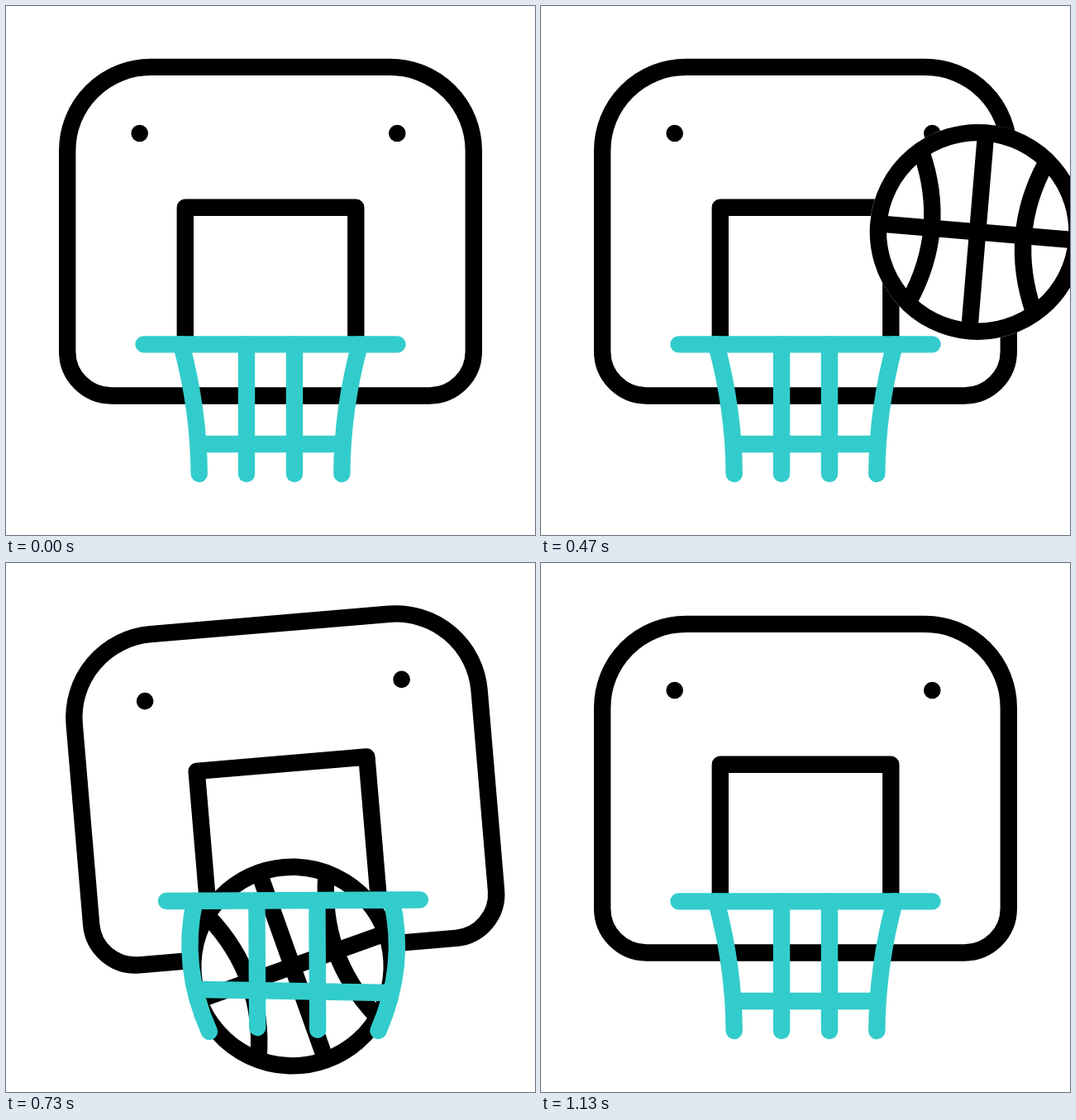
These frames come from a looping animation (640x640 px, 1.67 s). An HTML page with a canvas:

```html
<!DOCTYPE html>
<html lang="en">
<head>
<meta charset="utf-8">
<title>Basketball hoop</title>
<style>
  html, body { margin: 0; width: 100%; height: 100%; overflow: hidden; background: #fff; }
  canvas { display: block; width: 640px; height: 640px; }
</style>
</head>
<body>
<canvas id="stage" width="640" height="640"></canvas>
<script>
const ctx = document.getElementById('stage').getContext('2d');
const BLACK = '#000', TEAL = '#33cccc', WHITE = '#fff';
const LOOP = 1670, WIDTH = 20.4, RIM = 409.4, PIVOT = 84;
const RAD = Math.PI / 180, SIDES = [-1, 1];

// Times are in ticks of 1/30 s.
const part = (t, a, b) => Math.min(1, Math.max(0, (t - a) / (b - a)));
const ease = (t, a, b) => (1 - Math.cos(Math.PI * part(t, a, b))) / 2;
const pulse = (t, a, b, c) => ease(t, a, b) - ease(t, b, c);

function pen(color, cap) {
  ctx.strokeStyle = color;
  ctx.lineWidth = WIDTH;
  ctx.lineCap = cap;
  ctx.lineJoin = 'round';
}

function line(...p) {
  ctx.beginPath();
  for (let i = 0; i < p.length; i += 2) ctx.lineTo(p[i], p[i + 1]);
  ctx.stroke();
}

function bend(x0, y0, cx, cy, x1, y1) {
  ctx.beginPath();
  ctx.moveTo(x0, y0);
  ctx.quadraticCurveTo(cx, cy, x1, y1);
  ctx.stroke();
}

function disc(x, y, r, color) {
  ctx.fillStyle = color;
  ctx.beginPath();
  ctx.arc(x, y, r, 0, 2 * Math.PI);
  ctx.fill();
}

function turn(y, angle) {
  ctx.translate(320, y);
  ctx.rotate(angle * RAD);
  ctx.translate(-320, -y);
}

// The board swings back, forward and to rest.
function boardAngle(t) {
  return -5.5 * pulse(t, 18.6, 23, 27) + 2.65 * pulse(t, 23, 27, 31);
}

function drawBoard() {
  pen(BLACK, 'butt');
  ctx.beginPath();
  ctx.roundRect(74.2, 73.9, 491.6, 397.6, [101, 101, 53.5, 53.5]);
  ctx.stroke();
  line(216.8, 412, 216.8, 243.8, 423.3, 243.8, 423.3, 412);
  for (const s of SIDES) disc(317.5 + s * 155.8, 154, 10.3, BLACK);
}

// Thrown in along an arc, dropped, braked by the net, then falling on.
function ballPlace(t) {
  const thrown = 762 - 371 * ((t - 6) / 11) ** 1.45;
  const drift = 346.5 - 5.5 * Math.max(0, t - 22);
  const s = t - 21, fall = t - 16;
  const y = s > 0 ? 461 + 21.7 * s + 5.33 * s * s : 265 + (fall < 0 ? 2.1 : 7.84) * fall * fall;
  const roll = t < 17 ? 21.6 - 24.4 * (t - 17)
    : t < 22 ? 21.6 - 26.2 * (t - 17) : -109.6 - 17.7 * (t - 22);
  return { x: Math.max(thrown, drift), y, roll };
}

function drawBall(t) {
  const { x, y, roll } = ballPlace(t);
  ctx.save();
  ctx.translate(x, y);
  ctx.rotate(roll * RAD);
  disc(0, 0, 130.5, WHITE);
  pen(BLACK, 'butt');
  ctx.beginPath();
  ctx.arc(0, 0, 120.3, 0, 2 * Math.PI);
  ctx.stroke();
  line(-120, 0, 120, 0);
  line(0, -120, 0, 120);
  for (const s of SIDES) bend(-90, 75.5 * s, 0, 36 * s, 90, 75.5 * s);
  ctx.restore();
}

// The net bulges around the ball, then flicks to the left.
function drawNet(t, angle) {
  const bulge = pulse(t, 19, 22, 25), flick = pulse(t, 22, 25, 29);
  const bar = [];
  ctx.save();
  turn(PIVOT, angle);
  turn(RIM, -0.3 * bulge - 8.7 * flick - angle);
  pen(TEAL, 'round');
  line(166.6, RIM, 473.5, RIM);
  for (const s of SIDES) {
    const top = 320 + s * (108 + 11 * bulge);
    const mid = 320 + s * (92 + 32 * bulge + 13.5 * flick) - 5.5 * flick;
    const end = 320 + s * (86.3 + 16 * bulge + 25 * flick) - 20.5 * flick;
    const low = 566 + 1.5 * bulge + (5.3 * s - 1.7) * flick;
    bend(top, RIM, 2 * mid - (top + end) / 2, (RIM + low) / 2, end, low);

    const cord = 320 + s * 29 + (s - 1) * (7.5 * bulge + 4.5 * flick);
    line(cord, RIM, cord, 566 + (s - 1) * 1.5 * bulge);

    bar.push(320 + s * (87 + 25 * bulge + 16.5 * flick) + 2 * bulge - 9 * flick,
      530 + (2.6 * s - 10.8) * bulge + (1.25 * s - 5.2) * flick);
  }
  line(...bar);
  ctx.restore();
}

function drawSparks(t) {
  const head = 1.2 * part(t, 22.9, 30.3), tail = 1.2 * ease(t, 27.8, 33.8);
  if (head <= tail) return;
  const spark = (color, x, y, dx, dy) => {
    pen(color, 'round');
    line(x + dx * tail, y + dy * tail, x + dx * head, y + dy * head);
  };
  spark(TEAL, 265, 325, -81.4, -132.8);
  spark(TEAL, 387, 328, 67.5, -129);
  spark(BLACK, 325, 324, 0, -60);
}

function draw(ms) {
  const t = Math.floor(ms * 0.03 + 0.11);
  const angle = boardAngle(t);
  ctx.fillStyle = WHITE;
  ctx.fillRect(0, 0, 640, 640);
  ctx.save();
  turn(PIVOT, angle);
  drawBoard();
  ctx.restore();
  if (t >= 6 && t < 28) drawBall(t);
  drawNet(t, angle);
  ctx.save();
  turn(PIVOT, angle);
  drawSparks(t);
  ctx.restore();
}

const start = performance.now();
function tick() {
  draw((performance.now() - start) % LOOP);
  requestAnimationFrame(tick);
}
tick();
</script>
</body>
</html>
```
